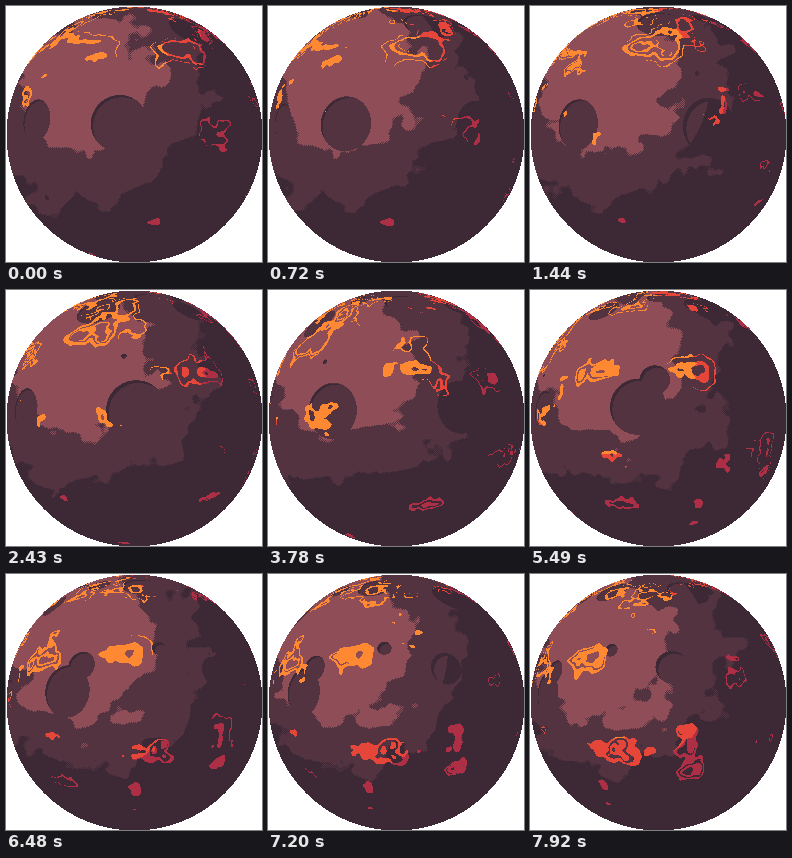
Write an HTML page with a canvas that moves like this. It is 256x256 px and loops after 8000 ms.

```html
<!DOCTYPE html>
<html lang="en">
<head>
<meta charset="utf-8">
<title>Lava planet</title>
<style>
  html, body { margin: 0; width: 100%; height: 100%; overflow: hidden; background: #fff; }
  canvas { display: block; width: 100vw; height: 100vh; image-rendering: pixelated; }
</style>
</head>
<body>
<canvas id="stage" width="256" height="256"></canvas>
<script>
const SIZE = 256, LOOP = 8000, STEP = 90, STEPS_PER_TURN = 240;
const SEED = 0.64, LIGHT = 0.3, SCALE = 10, CRATER_SCALE = 3.5;

const rgb = (r, g, b) => (255 << 24 | b << 16 | g << 8 | r) >>> 0;
const GROUND = [rgb(0x8f, 0x4d, 0x57), rgb(0x52, 0x33, 0x3f), rgb(0x3d, 0x29, 0x36)];
const LAVA = [rgb(0xff, 0x89, 0x33), rgb(0xe6, 0x45, 0x39), rgb(0xad, 0x2f, 0x45)];

const fract = x => x - Math.floor(x);
const smooth = x => x * x * (3 - 2 * x);
const clamp = x => Math.min(1, Math.max(0, x));

// Random lattice that wraps horizontally once per turn.
function lattice(rows) {
  const cols = rows * 2, values = new Float64Array(cols * rows);
  for (let y = 0; y < rows; y++)
    for (let x = 0; x < cols; x++)
      values[y * cols + x] = fract(Math.sin(x * 12.9898 + y * 78.233) * 15.5453 * SEED);
  return values;
}
const terrain = lattice(10), pits = lattice(4);

function noise(x, y) {
  const ix = Math.floor(x), iy = Math.floor(y);
  const sx = smooth(x - ix), sy = smooth(y - iy);
  const x0 = ix % 20, x1 = (ix + 1) % 20;
  const row0 = iy % 10 * 20, row1 = (iy + 1) % 10 * 20;
  const top = terrain[row0 + x0] * (1 - sx) + terrain[row0 + x1] * sx;
  const bottom = terrain[row1 + x0] * (1 - sx) + terrain[row1 + x1] * sx;
  return top + (bottom - top) * sy;
}

function fbm(x, y, octaves) {
  let sum = 0, weight = 0.5;
  for (let i = 0; i < octaves; i++) {
    sum += noise(x, y) * weight;
    x *= 2; y *= 2; weight /= 2;
  }
  return sum;
}

// 0 inside a pit, 1 outside; each lattice cell holds one pit.
function pit(x, y) {
  const row = Math.floor(y);
  x += row * 0.31;
  const col = Math.floor(x);
  const h = pits[row % 4 * 8 + col % 8];
  const centre = 0.25 + h * 0.5, radius = h * 0.25;
  const d = Math.hypot(x - col - centre, y - row - centre);
  return smooth(clamp((d - radius * 0.9) / (radius * 0.1 + 1e-9)));
}

function crater(u, v, shift) {
  const x = u * CRATER_SCALE + shift, y = v * CRATER_SCALE;
  return 1 - pit(x + 11, y + 11) * pit(x + 12, y + 12);
}

// Everything about a pixel that does not depend on time.
const points = [];
for (let py = 0; py < SIZE; py++) {
  for (let px = 0; px < SIZE; px++) {
    const x = px / SIZE, y = py / SIZE;
    if (Math.hypot(x - 0.5, y - 0.5) > 0.49999) continue;
    const cx = x * 2 - 1, cy = y * 2 - 1;
    const depth = 1 + Math.sqrt(Math.max(0, 1 - cx * cx - cy * cy));
    const warp = fbm(x, y, 3);
    points.push({
      index: py * SIZE + px,
      checker: (px + py) % 2 === 0,
      light: Math.hypot(x - LIGHT, y - LIGHT),
      landX: x * SCALE + warp, landY: y * SCALE + warp,
      u: cx / depth / 2 + 0.5, v: cy / depth / 2 + 0.5
    });
  }
}

function groundColor(p, shift) {
  const d = p.light + fbm(p.landX + shift, p.landY, 3) * 0.3;
  const edge = p.checker ? 2 / SIZE : 0;
  if (d > 0.6) return d < 0.6 + edge ? GROUND[1] : GROUND[2];
  return d > 0.4 && d >= 0.4 + edge ? GROUND[1] : GROUND[0];
}

function craterColor(p, shift) {
  const here = crater(p.u, p.v, shift);
  if (here < 0.5) return 0;
  const offset = (LIGHT - 0.5) * 0.03;
  const lit = crater(p.u + offset, p.v + offset, shift);
  const shaded = p.light > 0.4 || lit < here - (0.5 - p.light) * 2;
  return GROUND[shaded ? 2 : 1];
}

function lavaColor(p, shift) {
  const bend = fbm(p.u * SCALE + shift, p.v * SCALE, 4) * 2.5;
  const river = fbm(p.u + bend, p.v + bend, 4);
  if (river < 0.579) return 0;
  const d = p.light * p.light * 0.4 * (1 - river);
  return LAVA[d > 0.036 ? 2 : d > 0.019 ? 1 : 0];
}

const ctx = document.getElementById("stage").getContext("2d");
const image = ctx.createImageData(SIZE, SIZE);
const pixels = new Uint32Array(image.data.buffer);

function draw(step) {
  const turn = step / STEPS_PER_TURN;
  const shift = turn * 20, craterShift = turn * 8;
  for (const p of points)
    pixels[p.index] = lavaColor(p, shift) || craterColor(p, craterShift) || groundColor(p, shift);
  ctx.putImageData(image, 0, 0);
}

const start = performance.now();
let shown = -1;
function tick() {
  const step = Math.floor((performance.now() - start) % LOOP / STEP);
  if (step !== shown) draw(shown = step);
  requestAnimationFrame(tick);
}
tick();
</script>
</body>
</html>
```
